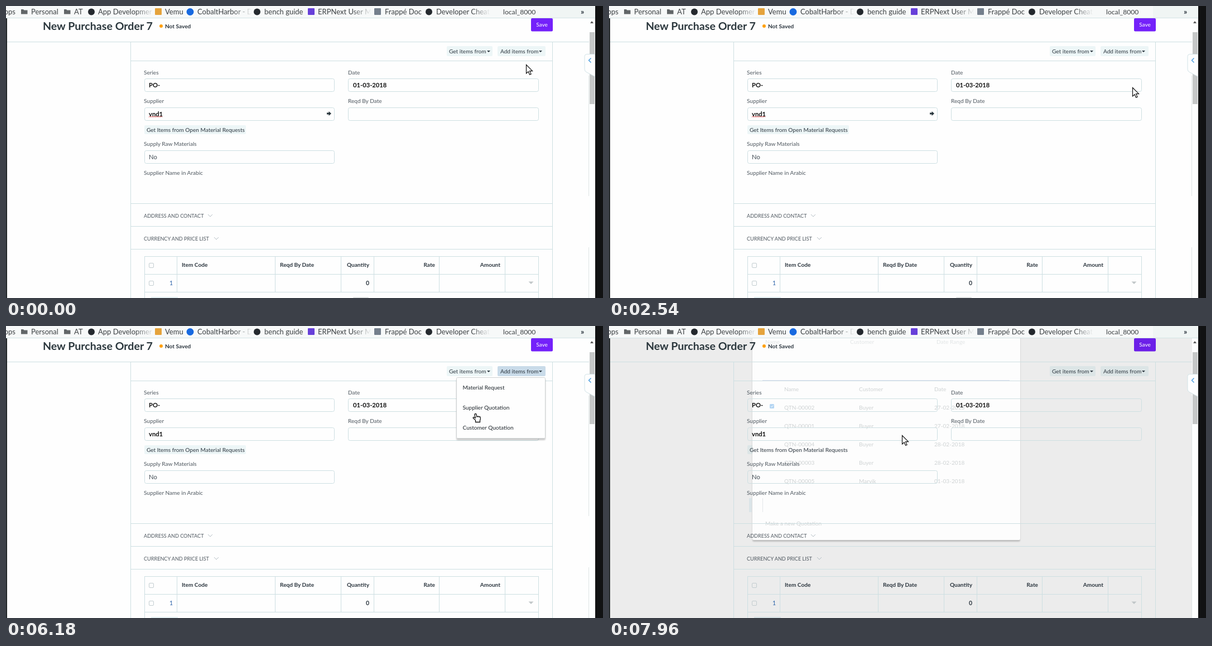
Recreate the animation shown at these times as an HTML page. Size 1070 by 524 pixels, loop 8000 ms.

```html
<!DOCTYPE html>
<html lang="en">
<head>
<meta charset="utf-8">
<title>New Purchase Order</title>
<style>
html, body { margin: 0; width: 100%; height: 100%; overflow: hidden; background: #fefefe; }
svg { display: block; width: 1070px; height: 524px; font-family: Lato, "Open Sans", sans-serif; }
text { white-space: pre; }
</style>
</head>
<body>
<svg id="stage" viewBox="0 0 1070 524">
  <defs>
    <linearGradient id="fade"><stop offset="0" stop-color="#f7f9f9" stop-opacity="0"/><stop offset=".7" stop-color="#f7f9f9"/></linearGradient>
    <filter id="shadow" x="-10%" y="-10%" width="120%" height="125%"><feDropShadow dx="0" dy="3" stdDeviation="1" flood-color="#000" flood-opacity=".2"/></filter>
  </defs>
  <g id="base"></g>
  <rect id="dim" x="2" y="22" width="1043" height="502"/>
  <g id="modal"></g>
  <g id="ink"></g>
  <g id="menu"></g>
  <path id="arrow" d="M0 0V15.5L3.6 12.2L6.1 17.7L8.6 16.6L6.1 11.2H11Z" fill="#fff" stroke="#111" stroke-width="1.2"/>
  <path id="hand" d="M0 0c-1.3 0-1.8 1-1.5 2l1.3 5.5-2.5-1.2c-1.4-.5-2.2.9-1.3 1.7l4 3.6V15H8V11.600c1-1.600 1-4 .6-5.600-.3-1-1.500-1.100-2-.4-.3-1.100-1.900-1.200-2.300-.3-.5-.9-1.700-.9-2-.2L1.500 1C1.300.3.700 0 0 0Z" fill="#fff" stroke="#111" stroke-width="1.3"/>
</svg>
<script>
const $ = id => document.getElementById(id);
const LINE = '#cddfe2', DARK = '#2c363f', LABEL = '#4f5860';

const text = (x, y, s, size = 10.1, fill = DARK, weight = 400, anchor = 'start') =>
  `<text x="${x}" y="${y}" font-size="${size}" fill="${fill}" font-weight="${weight}" text-anchor="${anchor}">${s}</text>`;
const bold = (x, y, s, size = 10.1, fill = DARK, anchor) => text(x, y, s, size, fill, 700, anchor);
const rect = (x, y, w, h, fill, more = '') =>
  `<rect x="${x}" y="${y}" width="${w}" height="${h}" fill="${fill}" ${more}/>`;
const box = (x, y, w, h, r = 3, stroke = LINE) =>
  rect(x + .5, y + .5, w - 1, h - 1, 'none', `rx="${r}" stroke="${stroke}"`);
const hline = (x, y, w, c = LINE) => rect(x, y, w, 1, c);
const vline = (x, y, h, c = LINE) => rect(x, y, 1, h, c);
const dot = (x, y, r, fill) => `<circle cx="${x}" cy="${y}" r="${r}" fill="${fill}"/>`;
const path = (d, fill = 'none', stroke = 'none', more = '') =>
  `<path d="${d}" fill="${fill}" stroke="${stroke}" ${more}/>`;
const triangle = (x, y, r, fill) => path(`M${x - r} ${y}h${2 * r}l${-r} ${r}z`, fill);

function drawBase() {
  return rect(0, 0, 1070, 524, '#fefefe') +
    rect(941, 22, 39, 23.5, '#7421fa', 'rx="2"') +
    rect(790, 72, 82, 18, '#edf6f7', 'rx="2"') +
    rect(881, 72, 86, 18, '#edf6f7', 'rx="2" id="addButton"') +
    rect(248, 214, 182, 16, '#edf6f7', 'rx="2"') +
    rect(260, 522, 48, 2, '#e4f0f3');
}

function drawBar() {
  const folder = x => path(`M${x} 6h4l1.500 1.500h6v7h-11.500z`, '#626668');
  const mark = x => dot(x, 10.5, 6, '#24292e');
  const square = (x, fill) => rect(x, 4, 12, 12, fill, 'rx="1"');
  const name = (x, s, size = 13) => text(x, 14.5, s, size, '#3c4043');
  // Long bookmark names fade out at their right end
  const cut = end => rect(end - 24, 1, 48, 19, 'url(#fade)');
  return rect(0, 0, 1056, 22, '#f7f9f9') + rect(975, 0, 81, 21, '#f0f5f4') +
    hline(0, 21, 1056, '#d3e4e5') +
    text(17, 14.5, 'Apps', 13, '#3c4043', 400, 'end') +
    folder(27) + name(45, 'Personal') + folder(104) + name(122, 'AT') +
    mark(153) + name(165, 'App Developmer') + cut(255) +
    square(267, '#e5a33c') + name(285, 'Vemu') +
    dot(330, 10.5, 6.5, '#1769e0') + name(343, 'CobaltHarbor - D') + cut(431) +
    mark(450) + name(463, 'bench guide') +
    square(541, '#6740d9') + name(559, 'ERPNext User M') + cut(645) +
    square(660, '#747f8c') + name(679, 'Frappé Doc') +
    mark(758) + name(771, 'Developer Cheat') + cut(858) +
    name(891, 'local_8000', 12.2) + bold(1030, 14.5, '»', 14);
}

function drawForm() {
  const value = (x, y, s) => bold(x, y, s, 11.2, '#111');
  const chevron = (x, y) => path(`M${x - 4} ${y - 2}l4 4 4-4`, 'none', '#b4bec4');
  const section = (y, s, x) => text(247, y + 3.5, s, 9.1, LABEL) + chevron(x, y);
  let s = bold(66, 42.5, 'New Purchase Order 7', 19.6, '#2b373d') +
    dot(278, 36, 3, '#ffa00a') + bold(285, 39.5, 'Not Saved') +
    text(960.5, 37, 'Save', 10.1, '#fff', 400, 'middle') +
    hline(2, 64, 1043) + vline(223, 64, 460) + vline(979, 64, 460) +
    [98, 354, 395, 436].map(y => hline(223, y, 757)).join('') +
    text(794, 84.5, 'Get items from') + triangle(865, 80, 3, DARK) +
    text(886, 84.5, 'Add items from') + triangle(958, 80, 3, DARK) +
    text(252, 225.5, 'Get Items from Open Material Requests');
  for (const [x, y, label] of [[247, 122.5, 'Series'], [613, 122.5, 'Date'], [247, 174, 'Supplier'],
    [613, 174, 'Reqd By Date'], [247, 251, 'Supply Raw Materials']])
    s += text(x, y, label, 10.1, LABEL) +
      box(x < 300 ? 248 : 613, Math.round(y + 7.5), x < 300 ? 341 : 342, 24);
  s += text(247, 302.5, 'Supplier Name in Arabic', 10.1, LABEL) +
    value(256, 146, 'PO-') + value(622, 146, '01-03-2018') + value(256, 197.5, 'vnd1') +
    text(256, 274.5, 'No', 11.3, '#444e56') +
    section(376, 'ADDRESS AND CONTACT', 366) + section(417, 'CURRENCY AND PRICE LIST', 377) +
    path('M256 199.5' + 'l1.500-1.500 1.500 1.500'.repeat(8), 'none', '#e23b3b', 'id="squiggle"') +
    rect(281, 187, 1, 13, '#111', 'id="caret"') +
    path('M575 191.500h3.500v-2.500l4.500 4-4.500 4v-2.500h-3.500z', '#29363d', 'none', 'id="link"') +
    rect(622, 522.5, 28, 1.5, '#d9dddd', 'rx="1" id="edge"');
  return s;
}

function drawTable() {
  const check = y => rect(256.5, y, 8, 8, 'none', 'rx="1.500" stroke="#c3cdd0"');
  return box(248, 449, 707, 65, 0) + hline(248, 481, 707) +
    [306, 482, 600, 659, 776, 894].map(x => vline(x, 449, 65)).join('') +
    vline(248, 513, 11) + vline(954, 513, 11) +
    check(461.5) + check(493.5) +
    bold(315, 468, 'Item Code') + bold(491, 468, 'Reqd By Date') +
    bold(651, 468, 'Quantity', 10.1, DARK, 'end') + bold(769, 468, 'Rate', 10.1, DARK, 'end') +
    bold(886, 468, 'Amount', 10.1, DARK, 'end') +
    text(293, 500.5, '1', 10.5, '#2a62a8') + bold(651, 500.5, '0', 10.5, DARK, 'end') +
    triangle(941, 494.5, 4.5, '#c0c6c8');
}

function drawEdges() {
  return rect(0, 22, 2, 502, '#24292b') + rect(1045, 22, 11, 502, '#fdfefe') +
    vline(1044, 125, 216, '#dfe5e6') + vline(1044, 433, 91, '#dfe5e6') +
    path('M1047 31l3-4 3 4z', '#555') + rect(1046, 47, 9, 129, '#c5c7c7') +
    path('M1056 86.500h-15q-4 0-4 4v23q0 4 4 5.500l15 8', '#fefefe', '#d3e3e7') +
    path('M1048.500 93.500l-4 4 4 4', 'none', '#3b95dc', 'stroke-width="1.300"') +
    rect(1056, 0, 14, 524, '#111213');
}

function drawModal() {
  const faint = (x, y, s, c = '#cfd3d4') => text(x, y, s, 10.1, c);
  const rows = [['00002', 'Buyer', '27-02'], ['00001', 'Buyer', '27-02'], ['00004', 'Buyer', '28-02'],
    ['00003', 'Buyer', '28-02'], ['00005', 'Marvik', '01-03']];
  let s = rect(257, -40, 480, 424, '#fefefe', 'opacity=".95" rx="3" filter="url(#shadow)"') +
    rect(251, 309, 5, 25, '#dbe4e8') + vline(275, 309, 25, '#e3e8ea') +
    faint(280, 32, 'Name', '#e2e5e6') + faint(432, 32, 'Customer', '#e2e5e6') + faint(587, 32, 'Date Range', '#e2e5e6') +
    hline(275, 97, 443, '#dcdff0') +
    faint(314, 116.5, 'Name') + faint(448, 116.5, 'Customer') + faint(583, 116.5, 'Date') +
    rect(288, 140, 8, 8, '#b5d6f3', 'rx="1.500"') + path('M290 144l1.500 1.500 3-3', 'none', '#fff') +
    faint(280, 357.5, 'Make a new Quotation');
  rows.forEach(([id, who, day], i) => {
    const y = 149.5 + 33 * i;
    s += faint(314, y, 'QTN-' + id) + faint(448, y, who) + faint(583, y, day + '-2018');
  });
  return s;
}

function drawMenu() {
  return rect(807.5, 92.5, 159, 109, '#fefefe', 'stroke="#cfd2d3" rx="2" filter="url(#shadow)"') +
    rect(808, 165, 158, 36, '#f2f5f7', 'id="hover"') +
    ['Material Request', 'Supplier Quotation', 'Customer Quotation']
      .map((s, i) => text(818.5, 114 + 36 * i, s, 10.1, '#1d242a')).join('');
}

$('base').innerHTML = drawBase();
$('modal').innerHTML = drawModal();
$('ink').innerHTML = drawForm() + drawTable() + drawBar() + drawEdges();
$('menu').innerHTML = drawMenu();

// Pointer stops: time, x, y
const stops = [
  [40, 932, 105], [830, 223, 80], [860, 223, 80], [1380, 161, 52], [1690, 161, 52],
  [1780, 165, 49], [1860, 190, 42], [2250, 988, 196], [2480, 938, 146], [2540, 938, 146],
  [2650, 959, 110], [2840, 926, 80], [3220, 926, 80], [3540, 73, 338], [3860, 400, 185],
  [4170, 400, 185], [4450, 1008, 150], [4740, 952, 75], [5720, 952, 75], [6180, 841, 157],
  [6480, 842, 178], [7610, 842, 178], [7950, 525, 196]
];
const ramp = (t, a, b) => Math.min(1, Math.max(0, (t - a) / (b - a)));

function pointer(t) {
  let [, x, y] = stops[0];
  for (let i = 1; i < stops.length; i++) {
    const [t0, x0, y0] = stops[i - 1], [t1, x1, y1] = stops[i];
    if (t < t0) break;
    const p = ramp(t, t0, t1), e = p * p * (3 - 2 * p);
    x = x0 + (x1 - x0) * e;
    y = y0 + (y1 - y0) * e;
  }
  return [Math.round(x), Math.round(y)];
}

const show = (id, on) => $(id).setAttribute('visibility', on ? 'visible' : 'hidden');

function render(t) {
  const focused = t < 5080, open = t >= 5110 && t < 7300, hand = t >= 5800 && t < 7300;
  show('caret', t >= 160 && t < 5050 && Math.floor((t - 160) / 612) % 2 === 0);
  show('squiggle', focused);
  show('edge', focused);
  show('link', t < 5750);
  show('menu', open);
  show('hover', open && t >= 6540);
  $('addButton').setAttribute('fill', open ? '#c9dbe9' : '#edf6f7');
  $('dim').setAttribute('opacity', .072 * ramp(t, 7800, 7930));
  const p = ramp(t, 7820, 7950);
  $('modal').setAttribute('opacity', p);
  $('modal').setAttribute('transform', `translate(0 ${-40 * (1 - p)})`);
  const [x, y] = pointer(t);
  show('arrow', !hand);
  show('hand', hand);
  $(hand ? 'hand' : 'arrow').setAttribute('transform', `translate(${x + .5} ${y + .5})`);
}

const start = performance.now();
function tick(now) {
  render(Math.max(0, now - start) % 8000);
  requestAnimationFrame(tick);
}
render(0);
requestAnimationFrame(tick);
</script>
</body>
</html>
```
